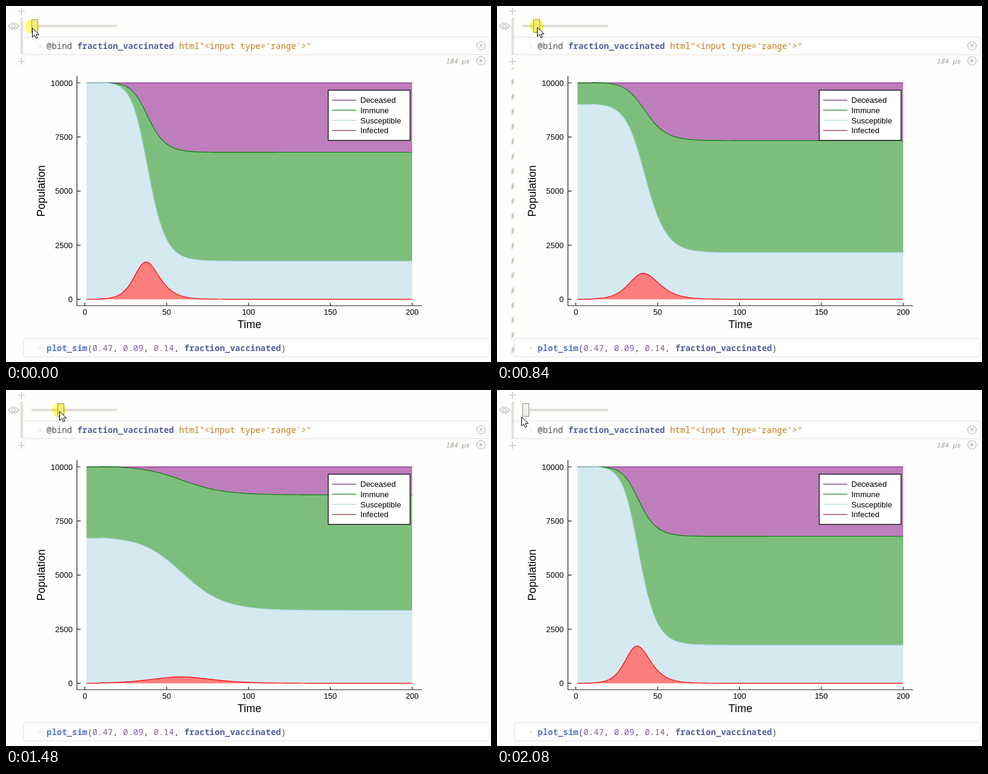
These frames come from a looping animation (800x588 px, 2120 ms). An HTML page:

```html
<!DOCTYPE html>
<html lang="en">
<head>
<meta charset="utf-8">
<title>Vaccination slider</title>
<style>
html, body { margin: 0; width: 100%; height: 100%; overflow: hidden; background: #fefefc; }
svg { display: block; width: 800px; height: 588px; }
text { white-space: pre; }
.code { font: 14px "Roboto Mono", "Noto Sans Mono", monospace; fill: #505058; }
.var { font-weight: 700; fill: #5660a0; }
.fn { font-weight: 600; fill: #5b78c8; }
.num { fill: #815ba4; }
.str { fill: #c67c1c; }
.plot { font: 13px "Liberation Sans", Arial, sans-serif; fill: #000; }
.title { font-size: 18px; }
.icon { fill: none; stroke: #bcb9b6; stroke-width: 1.2; }
.box { fill: #fff; stroke: #e4e1de; }
.axis { fill: none; stroke: #1c1c1c; stroke-width: 1.2; }
</style>
</head>
<body>
<svg viewBox="0 0 800 588">
  <rect width="800" height="588" fill="#fefefc"/>

  <!-- notebook cells -->
  <path d="M28 19h-2q-2 0-2 3v56q0 3 2 3h2z" fill="#e3dfdc"/>
  <path class="box" d="M28 51.5H794q3.500 0 3.500 3.500V77q0 3.500-3.500 3.500H28"/>
  <rect class="box" x="28.500" y="549.500" width="769" height="30" rx="3.500"/>
  <g class="icon">
    <path d="M20 8.500h11M25.500 3v11M20 91.500h11M25.500 86v11"/>
    <path d="M4 33q8.500-10.500 17 0q-8.500 10.500-17 0z"/>
    <circle cx="12.500" cy="33" r="3"/>
    <circle cx="783.500" cy="65.500" r="7"/>
    <path d="M780.700 62.700l5.600 5.600m0-5.600l-5.600 5.600"/>
    <circle cx="783.500" cy="90.500" r="7"/>
    <path d="M781.500 87v7l5-3.500z" fill="#bcb9b6" stroke="none"/>
  </g>
  <text class="code" x="52" y="71" style="fill:#aaa">·</text>
  <text class="code" x="67" y="71">@bind <tspan class="var">fraction_vaccinated</tspan> <tspan class="str">html"&lt;input type='range'&gt;"</tspan></text>
  <text class="code" x="52" y="570" style="fill:#aaa">·</text>
  <text class="code" x="67" y="570"><tspan class="fn">plot_sim</tspan>(<tspan class="num">0.47</tspan>, <tspan class="num">0.09</tspan>, <tspan class="num">0.14</tspan>, <tspan class="var">fraction_vaccinated</tspan>)</text>
  <text class="code" x="725" y="95" style="font-size:11px;font-style:italic;fill:#9a9794">184 µs</text>
  <path id="busy" fill="#d2c9c4"/>

  <!-- chart -->
  <g id="bands"></g>
  <g id="ticks"></g>
  <path class="axis" d="M117 116V495H686"/>
  <text class="plot title" x="401.500" y="532" text-anchor="middle">Time</text>
  <text class="plot title" transform="translate(64 305.500) rotate(-90)" text-anchor="middle">Population</text>
  <rect x="531.500" y="139" width="135" height="83" fill="#fff" stroke="#222" stroke-width="1.500"/>
  <g id="legend"></g>

  <!-- slider and pointer -->
  <rect x="42" y="31" width="141" height="4" rx="1" fill="#e1dcd8"/>
  <rect id="thumb" x="42.500" y="22.500" width="10" height="21" fill="#f4f0ee" stroke="#96928f"/>
  <circle id="halo" r="11.700" fill="#ffff78" style="mix-blend-mode:multiply"/>
  <path id="pointer" d="M0 0V15l3.500-3.300 2.400 5.300 2.600-1.100-2.400-5.200h5z" fill="#fff" stroke="#000"/>
</svg>
<script>
const $ = id => document.getElementById(id);
const LOOP = 2120, STEP = 40;
const px = t => 130 + 2.7 * t;
const py = n => 484.4 - 0.03574 * n;

function add(parent, tag, attrs, text = '') {
  const el = document.createElementNS('http://www.w3.org/2000/svg', tag);
  for (const k in attrs) el.setAttribute(k, attrs[k]);
  el.textContent = text;
  return parent.appendChild(el);
}

// name, line colour, legend line colour
const series = [
  ['Deceased', '#800080', '#551a55'],
  ['Immune', '#008000', '#1c8a1c'],
  ['Susceptible', '#add8e6', '#add8e6'],
  ['Infected', '#ff0000', '#a03848']
].map(([name, color, key], i) => {
  const y = 155.5 + 16.7 * i;
  add($('legend'), 'path', { d: `M538 ${y}h40`, stroke: key, 'stroke-width': 1.2 });
  add($('legend'), 'text', { class: 'plot', x: 584.5, y: y + 4.6 }, name);
  return {
    fill: add($('bands'), 'path', { fill: color, 'fill-opacity': 0.5 }),
    line: add($('bands'), 'path', { fill: 'none', stroke: color, 'stroke-width': 1.2 })
  };
});

for (let i = 0; i < 5; i++) {
  const x = px(50 * i), y = py(2500 * i);
  add($('ticks'), 'path', { class: 'axis', d: `M${x} 495v-5M117 ${y}h6` });
  add($('ticks'), 'text', { class: 'plot', x, y: 510, 'text-anchor': 'middle' }, 50 * i);
  add($('ticks'), 'text', { class: 'plot', x: 110, y: y + 4.7, 'text-anchor': 'end' }, 2500 * i);
}

let stripes = 'M24 103l3-2v2l-3 3z';
for (let y = 121; y < 575; y += 24.6) stripes += `M24 ${y + 2}l4-4v8l-4 5z`;
$('busy').setAttribute('d', stripes);

// Stacked levels of the epidemic, one row per day
function simulate(vaccinated) {
  const N = 1e4, rows = [];
  let S = N * (1 - vaccinated), R = N * vaccinated, I = 0;
  for (let t = 1; t <= 200; t++) {
    if (t === 10) I += 20;
    rows.push([N, S + I + R, S + I, I, 0]);
    const caught = 0.47 * S * I / N;
    S -= caught;
    R += 0.14 * I;
    I += caught - 0.23 * I;
  }
  return rows;
}

let shown = -1;
function drawPlot(v) {
  if (v === shown) return;
  shown = v;
  const rows = simulate(v);
  const edge = k => rows.map((r, i) => px(i + 1).toFixed(1) + ' ' + py(r[k]).toFixed(2));
  series.forEach((s, k) => {
    const top = edge(k);
    s.line.setAttribute('d', 'M' + top.join('L'));
    s.fill.setAttribute('d', 'M' + top.concat(edge(k + 1).reverse()).join('L') + 'z');
  });
}

// Keys are [time, value...]
const thumbKeys = [[120, 0], [400, 10], [800, 10], [840, 13.7], [1200, 33], [1480, 33], [1720, 4.5], [1840, 0]];
const pointerKeys = [[80, 43, 36], [400, 61, 35], [800, 61, 35], [840, 66, 35], [1200, 91, 36], [1440, 91, 36],
  [1480, 88, 35], [1720, 50, 41], [1920, 36, 43.5], [2000, 36, 43.5], [2080, 39.5, 44]];
const plotKeys = [[0, 0], [240, 0.03], [320, 0.07], [400, 0.1], [960, 0.14], [1080, 0.2], [1200, 0.27],
  [1320, 0.33], [1600, 0.3], [1680, 0.22], [1800, 0.08], [1880, 0]];
const busySpans = [[120, 400], [840, 1360], [1520, 1920]];

function tween(keys, t) {
  const i = keys.findIndex(k => k[0] > t);
  if (i < 0) return keys[keys.length - 1].slice(1);
  if (i === 0) return keys[0].slice(1);
  const a = keys[i - 1], b = keys[i], f = (t - a[0]) / (b[0] - a[0]);
  return a.slice(1).map((v, j) => v + (b[j + 1] - v) * f);
}
const hold = (keys, t) => keys.filter(k => k[0] <= t).pop()[1];
const show = (id, on) => $(id).setAttribute('visibility', on ? 'visible' : 'hidden');
const move = (id, x, y) => $(id).setAttribute('transform', `translate(${x} ${y})`);

function frame(now) {
  const t = Math.floor(now % LOOP / STEP) * STEP;
  const [x, y] = tween(pointerKeys, t);
  drawPlot(hold(plotKeys, t));
  move('thumb', Math.round(1.3 * Math.round(tween(thumbKeys, t)[0])), 0);
  move('pointer', Math.round(x) + 0.5, Math.round(y) + 0.5);
  move('halo', x - 0.5, y - 2);
  show('halo', t < 2040);
  show('busy', busySpans.some(([a, b]) => t >= a && t < b));
  requestAnimationFrame(frame);
}
frame(0);
</script>
</body>
</html>
```
